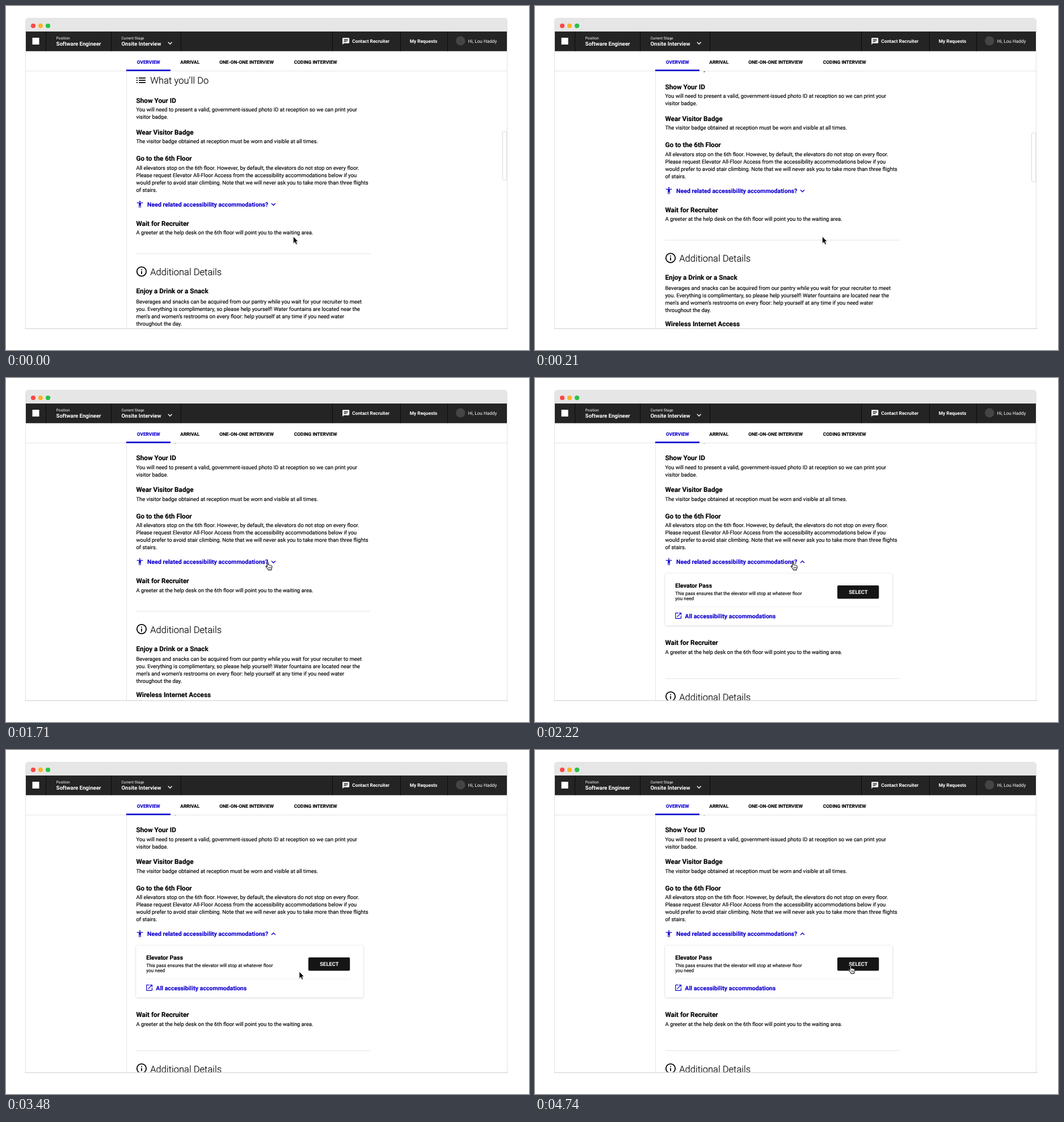
These frames come from a looping animation (922 px wide and 607 px high, 5400 ms). An HTML page:

```html
<!DOCTYPE html>
<html lang="en">
<head>
<meta charset="utf-8">
<title>Onsite interview guide</title>
<style>
  html, body { margin: 0; width: 100%; height: 100%; overflow: hidden; background: #fff; }
  svg { display: block; width: 922px; height: 607px; }
  text {
    font: 400 9.44px Roboto, sans-serif; color: #000; fill: currentColor;
    stroke: currentColor; stroke-width: .15; white-space: pre;
    text-rendering: geometricPrecision;
    transform: rotate(.002deg); /* lets baselines rest between pixels */
  }
  .h1 { font-weight: 300; font-size: 16.55px; }
  .h2 { font-weight: 700; font-size: 11.75px; }
  .h3 { font-weight: 700; font-size: 10.6px; }
  .note { font-size: 8.23px; }
  .tab { font-weight: 700; font-size: 8.32px; }
  .button { font-weight: 700; }
  .bar text, .button { color: #fff; stroke-width: 0; }
  .bar .tiny { font-size: 6.6px; }
  .bar .value { font-weight: 700; font-size: 9.58px; }
  .bar .user { font-size: 8.2px; }
  .blue { color: #1200cf; fill: currentColor; }
  .chevron { fill: none; stroke-width: 1.4; }
  .rule { stroke: #e4e4e4; }
</style>
</head>
<body>
<svg viewBox="0 0 922 607">
  <defs>
    <clipPath id="view"><rect x="35" y="115.3" width="848" height="453.2"/></clipPath>
    <filter id="soft" x="-10%" y="-20%" width="120%" height="140%">
      <feDropShadow dx="0" dy="0.5" stdDeviation="1.8" flood-opacity=".24"/>
    </filter>
    <filter id="drop" x="-50%" y="-50%" width="200%" height="200%">
      <feDropShadow dx="0" dy="0.8" stdDeviation=".7" flood-opacity=".3"/>
    </filter>
  </defs>

  <!-- window -->
  <path d="M34.5 569.5V26q0-4.5 4.5-4.5H879q4.5 0 4.5 4.5V569.5Z" fill="#fff" stroke="#e2e2e2"/>
  <path d="M33 569.3H885.5" stroke="#dcdcdc" stroke-width="1.6"/>
  <path d="M35 45V26q0-4 4-4H879q4 0 4 4V45Z" fill="#e6e6e6"/>
  <circle cx="48" cy="35" r="4.1" fill="#fb4948"/>
  <circle cx="61" cy="35" r="4.1" fill="#fdb12b"/>
  <circle cx="74" cy="35" r="4.1" fill="#29c246"/>

  <g clip-path="url(#view)">
    <path class="rule" d="M212.5 115V569"/>
    <g id="page">
      <path d="M230 126.3h2v1.8h-2zm0 4h2v1.8h-2zm0 4h2v1.8h-2zM234 126.3h12v1.8h-12zm0 4h12v1.8h-12zm0 4h12v1.8h-12z"/>
      <text class="h1" x="254.3" y="137.1">What you’ll Do</text>

      <text class="h2" x="229.5" y="170.9">Show Your ID</text>
      <text x="229.5" y="186.2">You will need to present a valid, government-issued photo ID at reception so we can print your</text>
      <text x="229.5" y="199.2">visitor badge.</text>
      <rect x="229" y="200.2" width="60" height="4" fill="#fff"/>

      <text class="h2" x="229.5" y="226.9">Wear Visitor Badge</text>
      <text x="229.5" y="242.2">The visitor badge obtained at reception must be worn and visible at all times.</text>

      <text class="h2" x="229.5" y="273.3">Go to the 6th Floor</text>
      <text x="229.5" y="288.8">All elevators stop on the 6th floor. However, by default, the elevators do not stop on every floor.</text>
      <text x="229.5" y="301.8">Please request Elevator All-Floor Access from the accessibility accommodations below if you</text>
      <text x="229.5" y="314.8">would prefer to avoid stair climbing. Note that we will never ask you to take more than three flights</text>
      <text x="229.5" y="327.8">of stairs.</text>

      <path class="blue" transform="translate(228.8 342.5) scale(.6)" d="M12 2a2 2 0 0 1 0 4 2 2 0 0 1 0-4zm9 7h-6v13h-2v-6h-2v6H9V9H3V7h18z"/>
      <text class="h3 blue" x="249" y="353.6">Need related accessibility accommodations?</text>
      <path id="arrow" class="chevron" stroke="#1200cf"/>

      <g id="wait">
        <text class="h2" x="229.5" y="387.9">Wait for Recruiter</text>
        <text x="229.5" y="403.2">A greeter at the help desk on the 6th floor will point you to the waiting area.</text>
      </g>

      <g id="details">
        <path class="rule" d="M229.5 437H642.5"/>
        <circle cx="239" cy="468.5" r="8.2" fill="none" stroke="#000" stroke-width="1.8"/>
        <path d="M238.1 464.2h1.8v1.8h-1.8zm0 3.5h1.8v5.2h-1.8z"/>
        <text class="h1" x="254.3" y="475.1">Additional Details</text>

        <text class="h2" x="229.5" y="507.1">Enjoy a Drink or a Snack</text>
        <text x="229.5" y="524.7">Beverages and snacks can be acquired from our pantry while you wait for your recruiter to meet</text>
        <text x="229.5" y="537.7">you. Everything is complimentary, so please help yourself! Water fountains are located near the</text>
        <text x="229.5" y="550.7">men’s and women’s restrooms on every floor: help yourself at any time if you need water</text>
        <text x="229.5" y="563.7">throughout the day.</text>
        <text class="h2" x="229.5" y="588.4">Wireless Internet Access</text>
      </g>
    </g>

    <g id="card">
      <rect x="229.5" y="345.5" width="400.5" height="91" fill="#fff" filter="url(#soft)"/>
      <text class="h3" x="247.3" y="369.6">Elevator Pass</text>
      <text class="note" x="247.3" y="383.1">This pass ensures that the elevator will stop at whatever floor</text>
      <text class="note" x="247.3" y="392.4">you need</text>
      <path d="M247.5 403.8H607" stroke="#f0f0f0"/>
      <rect x="533" y="366" width="73.3" height="23.5" rx="2" fill="#151515"/>
      <text class="button" x="553.3" y="381.2">SELECT</text>
      <path class="blue" transform="translate(245.3 412.2) scale(.61)" d="M19 19H5V5h7V3H5a2 2 0 0 0-2 2v14a2 2 0 0 0 2 2h14a2 2 0 0 0 2-2v-7h-2zM14 3v2h3.59l-9.83 9.83 1.41 1.41L19 6.41V10h2V3z"/>
      <text class="h3 blue" x="264.3" y="423.7">All accessibility accommodations</text>
    </g>
  </g>

  <!-- header -->
  <g class="bar">
    <path d="M35 45H883V79.7H35Z" fill="#242424"/>
    <path d="M70.5 45v34.7M185.5 45v34.7M308.5 45v34.7M575.5 45v34.7M695.5 45v34.7M778.5 45v34.7" stroke="#0c0c0c"/>
    <rect x="46.5" y="56" width="12" height="12" fill="#fff"/>
    <text class="tiny" x="88.5" y="59.2">Position</text>
    <text class="value" x="88.5" y="69.7">Software Engineer</text>
    <text class="tiny" x="203.5" y="59.2">Current Stage</text>
    <text class="value" x="203.5" y="69.7">Onsite Interview</text>
    <path class="chevron" d="M285.8 63.8l3.4 3.4 3.4-3.4" stroke="#fff"/>
    <path transform="translate(592 55) scale(.6)" fill="#fff" d="M20 2H4a2 2 0 0 0-2 2v18l4-4h14a2 2 0 0 0 2-2V4a2 2 0 0 0-2-2zM6 9h12v2H6zm8 5H6v-2h8zm4-6H6V6h12z"/>
    <text class="tab" x="610.3" y="65.4">Contact Recruiter</text>
    <text class="tab" x="711.8" y="65">My Requests</text>
    <circle cx="801.3" cy="61.5" r="8.2" fill="#454545"/>
    <text class="user" x="814.8" y="65">Hi, Lou Haddy</text>
  </g>
  <path class="rule" d="M35 114.7H883"/>
  <path class="blue" d="M212 112.2H290V115H212Z"/>
  <text class="tab blue" x="230.8" y="101.5">OVERVIEW</text>
  <text class="tab" x="307.3" y="101.5">ARRIVAL</text>
  <text class="tab" x="376.2" y="101.5">ONE-ON-ONE INTERVIEW</text>
  <text class="tab" x="507.8" y="101.5">CODING INTERVIEW</text>

  <rect id="thumb" x="875.5" y="221" width="7.3" height="86.5" rx="3" fill="#fff" stroke="#d9d9d9"/>

  <g id="cursor" filter="url(#drop)">
    <path id="pointer" d="M0 0V12.2L2.8 9.7 4.7 14 6.9 13 5 8.8H8.5Z" stroke="#fff" stroke-width=".8"/>
    <g id="hand" transform="translate(-4 -.3)" fill="#fff" stroke="#000" stroke-linejoin="round">
      <path d="M3.2 9.2V1.7C3.2.3 5.2.3 5.3 1.7V6C5.6 5 7.3 5.2 7.4 6.3 7.9 5.5 9.3 5.8 9.5 6.9 10.2 6.2 11.6 6.7 11.7 8 12 10 10.8 11.6 10.6 14.4H5C4.6 12.6 2.5 10.8 1 8.8 .2 7.3 1.6 6.6 2.4 7.6Z"/>
      <path d="M5.8 9v3M7.6 9v3M9.4 9v3" stroke-width=".7"/>
    </g>
  </g>
</svg>
<script>
  const LOOP = 5400, TICK = 30, OPEN_AT = 2130, SCROLL = 25.5;
  const $ = id => document.getElementById(id);

  // Pointer stops: time, x, y
  const stops = [
    [0, 506.5, 406.8], [420, 506.5, 406.8],
    [900, 463, 324.5], [1680, 462, 324.5],
    [1830, 454.5, 324.5], [2670, 454.5, 324.5],
    [2880, 548, 380], [3480, 517, 391],
    [4200, 517, 391], [4410, 556, 380], [LOOP, 556, 380]
  ];

  const clamp = u => Math.min(1, Math.max(0, u));
  const smooth = u => u * u * (3 - 2 * u);

  // Cubic Bezier ease (.25, .1, .25, 1), solved by bisection
  function ease(u) {
    const curve = (s, a, b) => 3 * (1 - s) * (1 - s) * s * a + 3 * (1 - s) * s * s * b + s * s * s;
    let lo = 0, hi = 1;
    for (let i = 0; i < 24; i++) {
      const mid = (lo + hi) / 2;
      if (curve(mid, .25, .25) < u) lo = mid; else hi = mid;
    }
    return curve(lo, .1, 1);
  }

  function pointerAt(t) {
    const i = stops.findIndex(s => s[0] > t);
    const [t0, x0, y0] = stops[i - 1], [t1, x1, y1] = stops[i];
    const k = smooth((t - t0) / (t1 - t0));
    return [x0 + (x1 - x0) * k, y0 + (y1 - y0) * k];
  }

  const inside = (x, y, l, t, r, b) => x >= l && x <= r && y >= t && y <= b;
  const move = (id, x, y) => $(id).setAttribute("transform", `translate(${x} ${y})`);
  const show = (id, on) => $(id).style.display = on ? "" : "none";

  function draw(time) {
    const t = Math.floor(time / TICK) * TICK;
    const open = t >= OPEN_AT;
    const scrolled = ease(clamp((t - 12) / 288));

    move("page", 0, -SCROLL * scrolled);
    move("thumb", 0, 3 * scrolled);
    show("thumb", t < 300);

    move("wait", 0, open ? 109 : 0);
    move("details", 0, open ? 119 : 0);
    show("card", open);
    $("arrow").setAttribute("d", open ? "M468 351.8l3.5-3.5 3.5 3.5" : "M468 348.3l3.5 3.5 3.5-3.5");

    const [x, y] = pointerAt(t);
    const hot = inside(x, y, 229, 316, 478, 333) || (open && inside(x, y, 533, 366, 606, 390));
    move("cursor", x, y);
    show("hand", hot);
    show("pointer", !hot);
  }

  const start = performance.now();
  function frame() {
    draw((performance.now() - start) % LOOP);
    requestAnimationFrame(frame);
  }
  frame();
</script>
</body>
</html>
```
